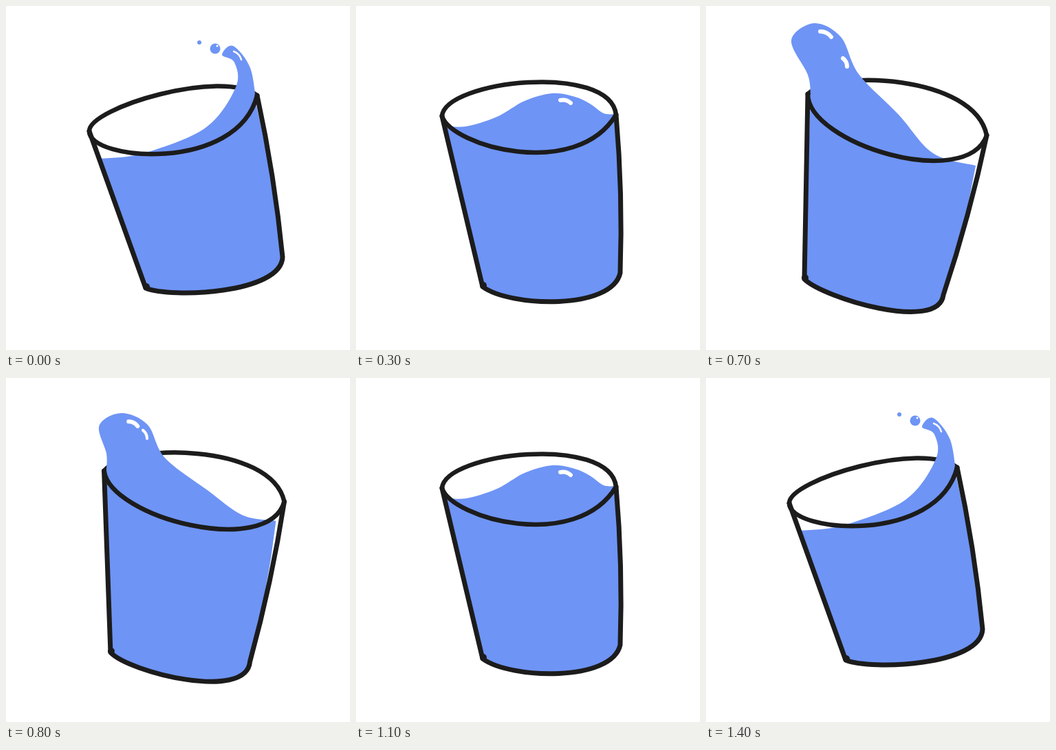
Write an HTML page with a canvas that moves like this. It is 500 px wide and 500 px high and loops after 1510 ms.

```html
<!DOCTYPE html>
<html lang="en">
<head>
<meta charset="utf-8">
<title>Sloshing glass</title>
<style>
html, body { margin: 0; height: 100%; overflow: hidden; background: #fff; }
canvas { display: block; width: 100vw; height: 100vh; }
</style>
</head>
<body>
<canvas width="500" height="500"></canvas>
<script>
const ctx = document.querySelector('canvas').getContext('2d');
const WATER = '#6e94f5', INK = '#1c1c1c', WHITE = '#fff';
const LOOP = 1510, STEP = 100, TURN = 7;

// rim: left and right end; back, front: curve handles between them;
// base: left corner, two handles, right corner; water: surface key points.
const poses = [{
  rim: [121,182, 365,130], back: [120,148, 315,90], front: [120,225, 336,243],
  base: [203,410, 240,425, 400,418, 402,365],
  water: [136,222, 200,214, 290,177, 334,118, 332,82, 314,71, 330,58, 355,90, 364,145],
  shine: [331,66, 342,78]
}, {
  rim: [125,160, 378,158], back: [130,108, 369,82], front: [139,204, 320,254],
  base: [184,408, 225,438, 372,442, 384,388],
  water: [128,174, 160,175, 205,161, 245,138, 285,127, 318,132, 340,142, 360,156, 378,157],
  shine: [297,137, 312,141]
}, {
  rim: [131,150, 397,162], back: [147,100, 376,80], front: [160,210, 388,245],
  base: [171,403, 195,434, 375,462, 375,395],
  water: [132,152, 142,132, 160,110, 190,106, 226,116, 250,152, 320,174, 372,168, 393,156],
  shine: [204,119, 211,123]
}, {
  rim: [148,128, 408,188], back: [185,92, 390,100], front: [148,200, 378,270],
  base: [143,397, 170,424, 338,475, 345,420],
  water: [152,130, 148,100, 124,50, 157,25, 196,45, 222,99, 280,158, 330,214, 392,232],
  shine: [166,37, 182,45]
}];
const swing = [0, 0.4, 0.8, 1, 1.5, 2, 2.68, 3];

function morph(stage) {
  const i = Math.min(Math.floor(stage), poses.length - 2), w = stage - i;
  const pose = {};
  for (const part in poses[i]) {
    pose[part] = poses[i][part].map((v, n) => v + (poses[i + 1][part][n] - v) * w);
  }
  return pose;
}

function stroke(width, color, trace) {
  ctx.beginPath();
  trace();
  ctx.lineWidth = width;
  ctx.strokeStyle = color;
  ctx.stroke();
}

function dot(x, y, r, color) {
  ctx.beginPath();
  ctx.arc(x, y, r, 0, 2 * Math.PI);
  ctx.fillStyle = color;
  ctx.fill();
}

// Smooth curve through a flat list of points.
function spline(flat) {
  const last = flat.length / 2 - 1;
  const at = i => {
    const n = 2 * Math.max(0, Math.min(last, i));
    return [flat[n], flat[n + 1]];
  };
  ctx.moveTo(...at(0));
  for (let i = 0; i < last; i++) {
    const [a, b, c, d] = [at(i - 1), at(i), at(i + 1), at(i + 2)];
    ctx.bezierCurveTo(b[0] + (c[0] - a[0]) / 6, b[1] + (c[1] - a[1]) / 6,
      c[0] - (d[0] - b[0]) / 6, c[1] - (d[1] - b[1]) / 6, ...c);
  }
}

// Right wall, bottom and left corner, continuing from the point (x, y).
function wallAndBase(x, y, [lx, ly, ax, ay, bx, by, rx, ry]) {
  ctx.quadraticCurveTo((x + rx) / 2 + 7, (y + ry) / 2, rx, ry);
  ctx.bezierCurveTo(bx, by, ax, ay, lx, ly);
}

function glint([x1, y1, x2, y2], width) {
  if (width <= 0) return;
  const dx = x2 - x1, dy = y2 - y1;
  stroke(width, WHITE, () => {
    ctx.moveTo(x1, y1);
    ctx.quadraticCurveTo((x1 + x2) / 2 + dy / 4, (y1 + y2) / 2 - dx / 4, x2, y2);
  });
}

function draw(stage) {
  const { rim, back, front, base, water, shine } = morph(stage);
  const [lx, ly, rx, ry] = rim;
  const rimEdge = handles => stroke(6.5, INK, () => {
    ctx.moveTo(lx, ly);
    ctx.bezierCurveTo(...handles, rx, ry);
  });
  ctx.fillStyle = WHITE;
  ctx.fillRect(0, 0, 500, 500);
  ctx.lineCap = ctx.lineJoin = 'round';

  rimEdge(back);
  ctx.beginPath();
  spline(water);
  wallAndBase(...water.slice(-2), base);
  ctx.fillStyle = WATER;
  ctx.fill();

  glint(shine, 2.5 + 3.5 * Math.min(1, stage));
  glint([199, 76, 205, 88], 6 * (stage - 2));

  rimEdge(front);
  stroke(7, INK, () => {
    ctx.moveTo(rx, ry);
    wallAndBase(rx, ry, base);
    ctx.lineTo(lx, ly);
  });
  dot(base[0] + 1, base[1] - 2, 5, INK);

  const size = Math.max(0, 1 - 1.5 * stage);
  dot(304, 62, 7.5 * size, WATER);
  dot(307, 58, 1.5 * size, WHITE);
  dot(281, 53, 3 * size, WATER);
}

function tick() {
  const step = Math.min(2 * TURN, Math.floor(performance.now() % LOOP / STEP));
  draw(swing[TURN - Math.abs(step - TURN)]);
  requestAnimationFrame(tick);
}
tick();
</script>
</body>
</html>
```
